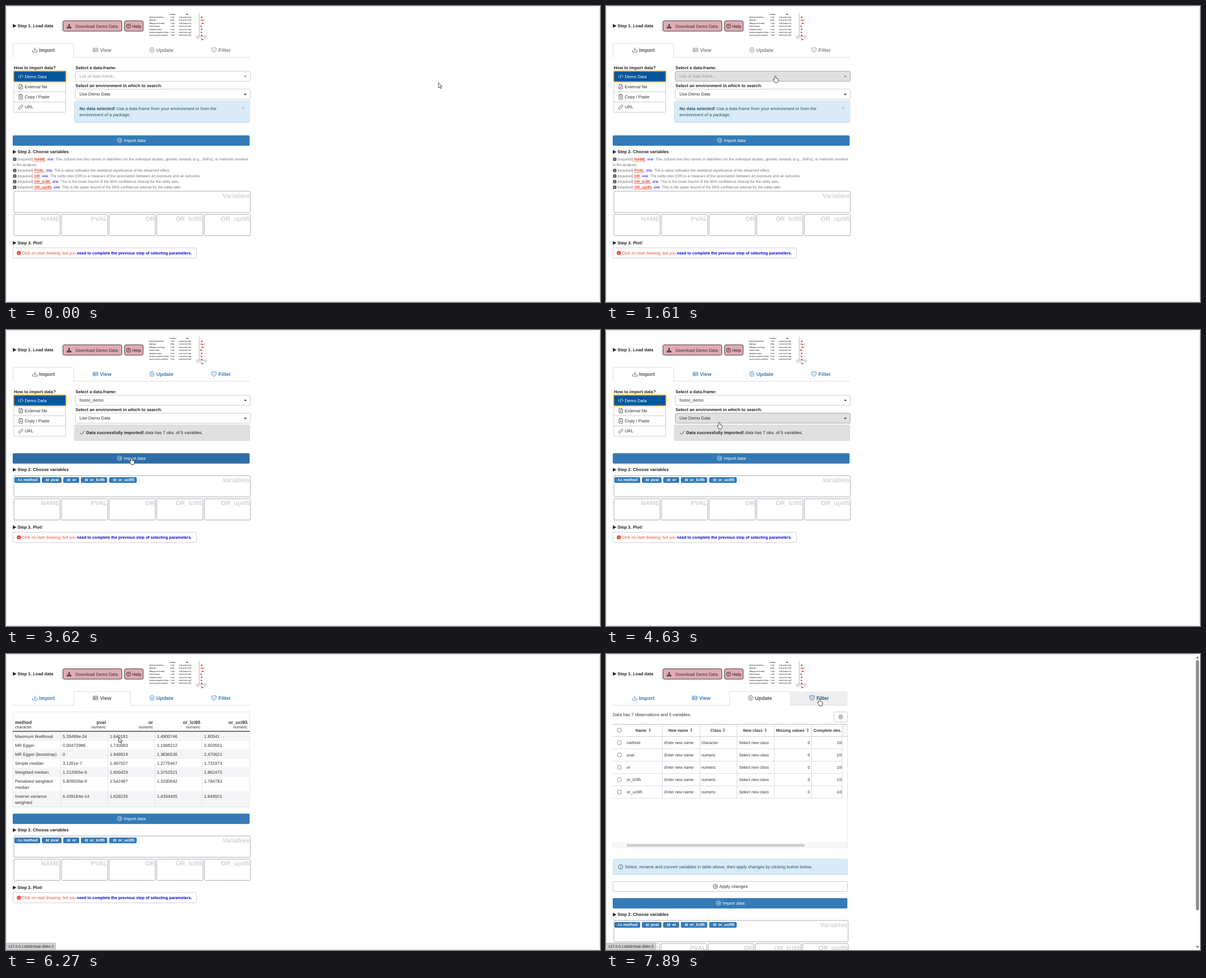
Write an HTML page that moves like this. It is 1059 px wide and 529 px high and loops after 7.99 s.

```html
<!DOCTYPE html>
<html lang="en">
<head>
<meta charset="utf-8">
<title>Load data</title>
<style>
  html, body { margin: 0; width: 100%; height: 100%; overflow: hidden; background: #fff; }
  svg { display: block; width: 1059px; height: 529px; }
  text { font-family: "Liberation Sans", Arial, sans-serif; text-rendering: geometricPrecision; }
  .b { font-weight: 700; }
  .i { font-style: italic; }
  .e { text-anchor: end; }
  .m { text-anchor: middle; }
  .u { font-weight: 700; text-decoration: underline; fill: #e8412c; }
  .one { fill: #0000dd; }
</style>
</head>
<body>
<svg id="stage" viewBox="0 0 1059 529"></svg>
<script>
const LOOP = 7990;
const BLUE = '#337ab7', INK = '#333', LINE = '#ccc', GREY = '#e0e0e0', INFO = '#24536b';
const BODY = 7.73, SMALL = 7.18, NOTE = 6.63;

const ROWS = [
  ['Maximum likelihood', '5.28499e-24', '1.640181', '1.4900746', '1.80541'],
  ['MR Egger', '0.00472986', '1.730983', '1.1968212', '2.503551'],
  ['MR Egger (bootstrap)', '0', '1.848914', '1.3836536', '2.470621'],
  ['Simple median', '3.1351e-7', '1.487507', '1.2775467', '1.731973'],
  ['Weighted median', '1.212065e-9', '1.600429', '1.3752521', '1.862475'],
  ['Penalised weighted median', '5.809506e-9', '1.542487', '1.3330842', '1.784783'],
  ['Inverse variance weighted', '6.439184e-14', '1.628235', '1.4334405', '1.849501']
];
const COLS = ['method', 'pval', 'or', 'or_lci95', 'or_uci95'];
const ZONES = ['NAME', 'PVAL', 'OR', 'OR_lci95', 'OR_upi95'];

const RING = 'M-3.9 0a3.9 3.9 0 1 0 7.8 0a3.9 3.9 0 1 0-7.8 0';
const ICONS = {
  tray: 'M-4 0V4H4V0M0-4V1.5M-2-.5L0 1.5L2-.5',
  table: 'M-4.2-3.2H4.2V3.2H-4.2ZM-4.2-1H4.2M-4.2 1.1H4.2M-1.6-1V3.2',
  gear: 'M-2.2-4H2.2L4.4 0L2.2 4H-2.2L-4.4 0ZM-1.7 0a1.7 1.7 0 1 0 3.4 0a1.7 1.7 0 1 0-3.4 0',
  shield: 'M-4-3.6H4V0Q3.6 3 0 4.4Q-3.6 3-4 0ZM-1.9 0L-.5 1.4L2-1.2',
  code: 'M-2.2-2.4L-4.6 0L-2.2 2.4M2.2-2.4L4.6 0L2.2 2.4M.9-3.4L-.9 3.4',
  file: 'M-3-4H1L3-2V4H-3ZM1-4V-2H3M-1.2-.2L1.2 2.4M1.2-.2L-1.2 2.4',
  clip: 'M-3.2-3.4H3.2V4H-3.2ZM-1.4-3.4V-4.4H1.4V-3.4M-1.6-.4H1.6M-1.6 1.4H1.6',
  link: 'M-1 1a2 2 0 0 1 0-2.6l1.6-1.6a1.9 1.9 0 0 1 2.7 2.7l-1 1M1-1a2 2 0 0 1 0 2.6l-1.6 1.6a1.9 1.9 0 0 1-2.7-2.7l1-1',
  go: RING + 'M-2 0H2M.4-1.6L2 0L.4 1.6',
  info: RING + 'M0-.5V2.1M0-2.2V-1.5',
  check: 'M-4 .4L-1.4 3L4-3',
  hash: 'M-1.2-3L-2 3M2-3L1.2 3M-3.2-1.1H3.4M-3.4 1.1H3.2',
  cross: 'M-2.2-2.2L2.2 2.2M2.2-2.2L-2.2 2.2',
  sort: 'M-2-.8L0-3.2L2-.8ZM-2 .8L0 3.2L2 .8Z',
  save: 'M-.9-4H.9V-.6H2.6L0 2L-2.6-.6H-.9ZM-4 1.2H-2L0 3L2 1.2H4V4H-4Z',
  play: 'M-3-3.5L3.2 0L-3 3.5Z',
  caret: 'M-2.6-1.3H2.6L0 1.5Z',
  up: 'M-2.8 2L0-2.2L2.8 2Z',
  down: 'M-2.8-2L0 2.2L2.8-2Z'
};
const SOLID = ['sort', 'save', 'play', 'caret', 'up', 'down'];

const ARROW = 'M0 0V9.2L2.1 7.2L3.6 10.4L5 9.8L3.6 6.7H6.5Z';
const HAND = 'M-1 1a1 1 0 0 1 2 0v3.4l3 .6q1.2 .3 1.2 1.5l-.4 3q-.2 1-.8 1.6v1h-5v-1l-2.8-4.2q-.3-1 .6-1.3l1.2 1z';

// Pointer legs: start, step length, step count, end x, end y
const LEGS = [
  [100, 98, 6, 601, 152], [910, 100, 8, 302, 125], [2010, 100, 9, 238, 147],
  [3020, 100, 5, 224, 228.5], [4130, 100, 8, 198, 153], [4950, 100, 7, 183, 81.5],
  [5750, 103, 6, 201, 149], [6370, 100, 2, 235, 122], [6570, 100, 4, 288, 82],
  [7370, 100, 6, 381, 80.5]
];

function rect(x, y, w, h, fill, stroke = 'none', r = 0, more = '') {
  return `<rect x="${x}" y="${y}" width="${w}" height="${h}" rx="${r}" fill="${fill}" stroke="${stroke}" ${more}/>`;
}
function line(x1, y1, x2, y2, color, width = 1) {
  return `<path d="M${x1} ${y1}L${x2} ${y2}" stroke="${color}" stroke-width="${width}"/>`;
}
// y is the middle of the capitals
function text(x, y, str, cls = '', fill = INK, size = BODY) {
  return `<text x="${x}" y="${(y + size * 0.36).toFixed(2)}" class="${cls}" fill="${fill}" font-size="${size}">${str}</text>`;
}
function icon(name, x, y, color = INK, scale = 1) {
  const paint = SOLID.includes(name) ? `fill="${color}"` : `fill="none" stroke="${color}" stroke-width=".8"`;
  return `<path d="${ICONS[name]}" transform="translate(${x} ${y}) scale(${scale})" ${paint}/>`;
}
function badge(x, y, r, color) {
  return `<circle cx="${x}" cy="${y}" r="${r}" fill="${color}"/>` + text(x, y, 'i', 'b m', '#fff', r * 1.7);
}
function heading(y, str) {
  return icon('play', 15.3, y, '#222') + text(20.5, y, str, 'b', '#222');
}

function pointer(t) {
  let x = 771, y = 137;
  for (const [start, step, n, tx, ty] of LEGS) {
    if (t < start) break;
    const k = Math.min(n, Math.floor((t - start) / step) + 1) / n;
    const e = k * k * (3 - 2 * k);
    x += (tx - x) * e;
    y += (ty - y) * e;
  }
  return { x, y };
}

function miniPlot() {
  let s = text(297, 14.8, 'P-value', 'b m', '#111', 3) + text(323, 14.8, 'OR', 'b m', '#111', 3);
  const px = v => 344.5 + (v - 1) * 7;
  s += line(344.5, 12, 344.5, 54, '#999', 0.7) + line(339, 54, 358, 54, '#555', 0.6);
  ROWS.forEach((row, i) => {
    const y = 20 + i * 5.42;
    const [or, lo, hi] = row.slice(2).map(Number);
    s += text(255.5, y, row[0], 'b', '#111', 2.66) + text(293, y, i === 1 ? '0.005' : '&lt; 0.01', 'b', '#111', 2.7);
    s += text(308, y, `${or.toFixed(3)} (${lo.toFixed(3)}-${hi.toFixed(3)})`, 'b', '#111', 2.5);
    s += line(px(lo), y, px(hi), y, '#456', 0.5) + `<circle cx="${px(or)}" cy="${y}" r="1.2" fill="#f02020"/>`;
  });
  [0.5, 1, 1.5, 2.5].forEach(v => s += text(px(v), 57, v, 'm', '#222', 2.6));
  return s + text(350, 60.3, 'OR', 'b m', '#111', 2.8);
}

function topBar() {
  return heading(35.5, 'Step 1. Load data') +
    rect(101.5, 26.5, 105, 18.5, '#dfaab3', '#444', 2.5) + icon('save', 112.5, 36, INK) +
    text(124, 36, 'Download Demo Data') +
    rect(211.5, 26.5, 33, 18.5, '#dfaab3', '#444', 2.5) +
    `<circle cx="218.7" cy="36" r="3.7" fill="none" stroke="#222" stroke-width=".8"/>` +
    text(218.7, 36, '?', 'b m', '#222', 6) + text(225, 36, 'Help', '', '#222') + miniPlot();
}

const TABS = [
  ['Import', 'tray', 51.5, 59, 12, 120.5], ['View', 'table', 159.5, 167.5, 120.5, 221.5],
  ['Update', 'gear', 260.3, 268, 221.5, 331.5], ['Filter', 'shield', 370.8, 378.8, 331.5, 434.5]
];
function tabs(st) {
  let s = line(12, 91.5, st.fit(434.5), 91.5, '#ddd');
  TABS.forEach(([name, ic, ix, tx, l, r], i) => {
    const x0 = st.fit(l), x1 = st.fit(r), active = i === st.tab, hot = i === st.hotTab;
    const color = active ? '#555' : hot ? '#23527c' : st.picked ? BLUE : '#858585';
    if (hot) s += rect(x0, 67, x1 - x0, 24, '#eee', 'none', 2);
    if (active) {
      s += rect(x0 + 0.5, 89, x1 - x0 - 1, 4, '#fff') +
        `<path d="M${x0 + 0.5} 92V69q0-2 2-2H${x1 - 2}q2 0 2 2V92" fill="#fff" stroke="#ddd"/>`;
    }
    s += icon(ic, st.fit(ix), 78.5, color) + text(st.fit(tx), 78.6, name, 'b', color, 9);
  });
  return s;
}

function select(y, str, hot, color, caret = INK) {
  return rect(123.5, y + 0.5, 312, 18, hot ? GREY : '#fff', hot ? '#adadad' : LINE, 2) +
    text(131, y + 9.7, str, '', color) + icon('caret', 426.6, y + 10, caret);
}

function importPane(st) {
  let s = text(14, 110.5, 'How to import data?', 'b', '#222');
  const modes = [['External file', 'file'], ['Copy / Paste', 'clip'], ['URL', 'link']];
  s += rect(14, 135, 92.5, 55, '#fff', LINE, 2);
  modes.forEach(([name, ic], i) => {
    const y = 144.1 + i * 18.3;
    if (i) s += line(14, y - 9.2, 106.5, y - 9.2, LINE);
    s += icon(ic, 26.3, y, '#444') + text(33.3, y, name);
  });
  s += rect(13.8, 116.3, 93, 19, '#05559c', '#f0a520', 1.5, 'stroke-width="1.7"') +
    icon('code', 26.3, 125.8, '#fff') + text(33.5, 125.8, 'Demo Data', '', '#fff');
  s += text(124, 110.5, 'Select a data.frame:', 'b', '#222');
  s += st.picked ? select(116, 'forest_demo', st.hotData, INK)
    : select(116, 'List of data.frame...', st.hotData || st.open, st.open ? '#555' : '#999', st.open ? INK : '#888');
  s += text(124, 142.5, 'Select an environment in which to search:', 'b', '#222') +
    select(148, 'Use Demo Data', st.hotEnv, INK);
  if (st.picked) {
    s += rect(122, 169.5, 312.5, 28, GREY, '#d8d8d8', 2) + icon('check', 136, 183.5, '#222') +
      text(143, 183.5, '<tspan class="b">Data successfully imported!</tspan> data has 7 obs. of 5 variables.', '', '#222');
  } else {
    s += rect(122, 169.5, 312.5, 39, '#d9ebf6', '#c3e2ee', 2) +
      text(131, 183.5, '<tspan class="b">No data selected!</tspan> Use a data.frame from your environment or from the', '', INFO) +
      text(131, 194.6, 'environment of a package.', '', INFO) + icon('cross', 422.5, 182.8, '#9aaab2');
  }
  if (st.open) {
    s += rect(123, 138.5, 313, 28.5, '#000', 'none', 2, 'opacity=".1"') +
      rect(123.5, 137.5, 312, 27.5, '#fff', LINE, 2) +
      rect(124.5, 140.3, 288.5, 14.8, '#f8f8f8', '#f5a623', 0, 'stroke-width="1.8"') +
      text(135, 147.4, 'forest_demo', '', INK, 8.8) + text(188, 147.4, '7 obs. of 5 variables', '', '#888', 7.5);
  }
  return s;
}

function viewPane() {
  const left = [16, 101, 185, 269, 353], right = [0, 178, 262, 346.5, 430.5];
  const edges = [139, 155, 171, 187, 203, 219, 246, 273];
  let s = '';
  ROWS.forEach((row, i) => {
    const top = edges[i], h = edges[i + 1] - top, y = top + 8;
    if (i % 2 === 0) s += rect(12, top, 422.5, h, '#f5f5f7');
    s += line(12, top + h, 434.5, top + h, '#ececec', 0.6);
    row.forEach((cell, j) => {
      const cut = h > 20 && !j ? cell.lastIndexOf(' ') : cell.length;
      s += text(left[j], y, cell.slice(0, cut));
      if (cut < cell.length) s += text(left[j], y + 11.1, cell.slice(cut + 1));
    });
  });
  COLS.forEach((c, j) => {
    const x = j ? right[j] : left[0], cls = j ? 'e' : '';
    s += text(x, 122, c, 'b ' + cls, INK, 8.28) + text(x, 130.5, j ? 'numeric' : 'character', 'i ' + cls, INK, SMALL);
    if (j) s += line(left[j] - 3.5, 139, left[j] - 3.5, 273, '#e4e4e4', 0.8);
  });
  return s + rect(12.5, 103.5, 422, 170, 'none', '#e6e6e6') + line(12, 138.2, 434.5, 138.2, '#444', 1.4);
}

function updatePane() {
  const edges = [100.5, 167.5, 233.5, 300, 366.5, 421];
  const heads = [['Name', 52.5, 78], ['New name', 111, 152], ['Class', 186, 210.3], ['New class', 244.5, 284.6],
    ['Missing values', 303, 359.5], ['Complete obs.', 370, 0]];
  const box = y => rect(20.5, y - 3.3, 6.6, 6.6, '#fff', '#777', 1.2, 'stroke-width=".8"');
  let s = text(12, 108.5, 'Data has 7 observations and 5 variables.') +
    rect(406.5, 103.5, 24, 18, '#fff', LINE, 2) + icon('gear', 418.5, 112.5, INK, 0.85) + box(136);
  heads.forEach(([h, x, sx]) => {
    s += text(x, 136, h, 'b', INK, SMALL);
    if (sx) s += icon('sort', sx, 136, '#444', 0.9);
  });
  COLS.forEach((c, i) => {
    const y = 158.2 + i * 22.15;
    s += box(y) + text(37, y, c, '', INK, SMALL) + text(104, y, 'Enter new name', 'i', INK, SMALL) +
      text(170, y, i ? 'numeric' : 'character', '', INK, SMALL) + text(237, y, 'Select new class', 'i', INK, SMALL) +
      text(363.5, y, '0', 'e', INK, SMALL) + text(411.5, y, '100', '', INK, SMALL) +
      line(12, y + 11.1, 421, y + 11.1, '#dcdce6');
  });
  s += rect(421, 126, 9.5, 220, '#fff') + rect(421, 126, 9.5, 21, '#f7f7f7');
  edges.forEach(x => s += line(x, 126, x, 258.3, '#d4d4ea', 0.9));
  s += line(12, 125.6, 430.5, 125.6, '#bbb') + line(12, 147.3, 430.5, 147.3, '#ccc') + line(430.5, 126, 430.5, 346, '#e6e6e6');
  s += rect(12, 337, 418.5, 9.5, '#f7f7f7', '#efefef') + rect(37, 339.8, 317, 4.4, '#cbcbcb');
  s += rect(12.5, 366.5, 418, 28, '#d9ebf6', '#c3e2ee', 2) + icon('info', 26, 380.5, INFO) +
    text(33.5, 380.5, 'Select, rename and convert variables in table above, then apply changes by clicking button below.', '', INFO);
  return s + rect(12.5, 406.5, 418, 18, '#fff', LINE, 2) + icon('go', 195, 415.3) + text(202, 415.3, 'Apply changes');
}

const HELP = [
  [33.7, 'NAME', 'This column lists the names or identifiers for the individual studies, genetic variants (e.g., SNPs), or methods involved'],
  [53.7, 'PVAL', 'The p-value indicates the statistical significance of the observed effect.'],
  [63.7, 'OR', 'The odds ratio (OR) is a measure of the association between an exposure and an outcome.'],
  [73.7, 'OR_lci95', 'This is the lower bound of the 95% confidence interval for the odds ratio.'],
  [83.7, 'OR_upi95', 'This is the upper bound of the 95% confidence interval for the odds ratio.']
];
const TAGS = [[15, 46, 31], [64, 35, 80], [102, 28.5, 118], [133.5, 47, 149.5], [184, 49, 200]];

function dropZone(x0, x1, y, label) {
  return rect(x0, y, x1 - x0, 38, 'none', '#2b3a4d', 2, 'stroke-dasharray="1.65 1.1" stroke-width=".7"') +
    text(x1 - 1.2, y + 7.7, label, 'b e', '#d3d3d3', 11.05);
}

function lower(st) {
  const c = st.top + 9.2, fit = st.fit;
  let s = rect(12, st.top + 0.2, fit(434.3) - 12, 18.5, st.hotImport ? '#2f6da8' : BLUE, 'none', 2) +
    icon('go', fit(202.5), c, '#fff') + text(fit(210), c, 'Import data', '', '#fff') +
    heading(c + 20.5, 'Step 2. Choose variables');
  if (!st.imported) {
    HELP.forEach(([dy, name, str]) => {
      s += badge(15.5, c + dy, 3.2, '#555') + text(20.5, c + dy,
        `[required] <tspan class="u">${name}</tspan>, <tspan class="one">one</tspan>. ${str}`, '', '#707070', NOTE);
    });
    s += text(12, c + 43.2, 'in the analysis.', '', '#707070', NOTE);
  }
  const y = c + (st.imported ? 31 : 90.8);
  s += dropZone(14, fit(435.7), y, 'Variables');
  ZONES.forEach((z, i) => s += dropZone(fit(14 + i * 84.9), fit(96.3 + i * 84.9), y + 41.4, z));
  if (st.imported) {
    TAGS.forEach(([x, w, tx], i) => {
      s += rect(x, y + 2.7, w, 10.3, BLUE, 'none', 2) + text(tx, y + 7.6, COLS[i], 'b', '#fff', 7);
      s += i ? icon('hash', tx - 6.2, y + 7.7, '#fff', 0.9) : text(20.3, y + 7.6, 'Aa', '', '#fff', 7);
    });
  }
  return s + heading(y + 92.4, 'Step 3. Plot!') + rect(12.5, y + 101.2, 327, 18.3, '#fff', '#d0d0d0', 2) +
    badge(23, y + 110.4, 3.6, '#e8412c') +
    text(28, y + 110.4, 'Click on start drawing, but you <tspan class="b one">need to complete the previous step of selecting parameters.</tspan>', '', '#e84c3d', 7.2);
}

function scrollBar() {
  return rect(1050, 0, 9, 529, '#fcfcfc') + rect(1051.8, 11, 5.4, 447, '#8a8a8a', 'none', 2.7) +
    icon('up', 1054.5, 6, '#8a8a8a') + icon('down', 1054.5, 523.8, '#8a8a8a');
}

function stateAt(t) {
  const p = pointer(t);
  const hit = (x0, y0, x1, y1) => p.x >= x0 && p.x <= x1 && p.y >= y0 && p.y <= y1;
  const st = {
    p, tab: t < 5650 ? 0 : t < 7170 ? 1 : 2,
    open: t >= 1910 && t < 2920, picked: t >= 2920, imported: t >= 3520,
    table: t >= 5750 && t < 7170, grid: t >= 7270
  };
  const k = st.grid ? 0.9905 : 1;
  st.fit = x => 12 + (x - 12) * k;
  st.top = st.grid ? 436 : t >= 5750 ? 285 : st.picked ? 220 : 231;
  st.hotTab = TABS.findIndex((tab, i) => i !== st.tab && hit(st.fit(tab[4]), 67, st.fit(tab[5]), 91));
  st.hotData = st.tab === 0 && hit(123, 116, 436, 135);
  st.hotEnv = st.tab === 0 && !st.open && hit(123, 148, 436, 167);
  st.hotImport = hit(12, st.top, st.fit(434.5), st.top + 18.5);
  st.hand = st.hotTab >= 0 || st.hotData || st.hotEnv || st.hotImport;
  st.link = t >= 7690 ? 5 : t >= 6870 ? 3 : t >= 5450 ? 2 : 0;
  return st;
}

function scene(t) {
  const st = stateAt(t);
  let s = rect(0.5, 0.5, 1058, st.grid ? 600 : 528, '#fff', '#ddd', 4) + topBar() + tabs(st);
  if (st.tab === 0) s += importPane(st);
  if (st.table) s += viewPane();
  if (st.grid) s += updatePane();
  s += lower(st);
  if (st.grid) s += scrollBar();
  if (st.link) {
    s += rect(0.5, 516.5, 88, 12, '#d0d0d0', '#bdbdbd', 1.5) +
      text(4, 522.7, '127.0.0.1:6692/#tab-5964-' + st.link, '', '#222', 6.56);
  }
  return s + `<path d="${st.hand ? HAND : ARROW}" transform="translate(${st.p.x.toFixed(2)} ${st.p.y.toFixed(2)})" fill="#fff" stroke="#222" stroke-width=".8" stroke-linejoin="round"/>`;
}

const stage = document.getElementById('stage');
let shown = '', begin = null;
function tick(now) {
  if (begin === null) begin = now;
  const markup = scene((now - begin) % LOOP);
  if (markup !== shown) stage.innerHTML = shown = markup;
  requestAnimationFrame(tick);
}
stage.innerHTML = shown = scene(0);
requestAnimationFrame(tick);
</script>
</body>
</html>
```
